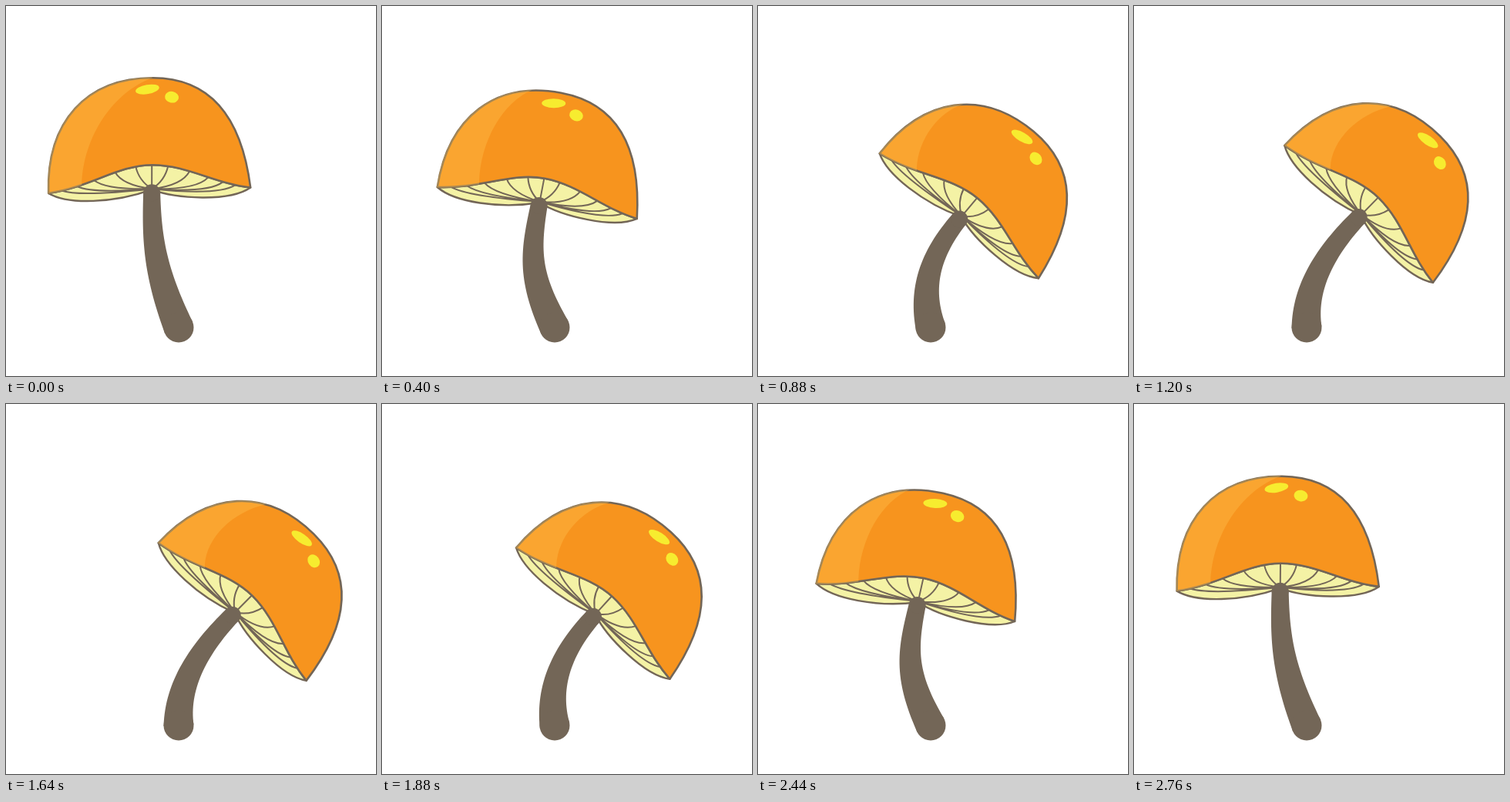
Write an HTML page with a canvas that moves like this. It is 480 px wide and 480 px high and loops after 2800 ms.

```html
<!DOCTYPE html>
<html lang="en">
<head>
<meta charset="utf-8">
<title>Swaying mushroom</title>
<style>
  html, body { margin: 0; width: 100%; height: 100%; overflow: hidden; background: #fff; }
  canvas { display: block; width: 480px; height: 480px; }
</style>
</head>
<body>
<canvas id="stage" width="480" height="480"></canvas>
<script>
const ctx = document.getElementById('stage').getContext('2d');
const LOOP = 2800, LAG = 36, STEP = 40;
const BROWN = '#736657', ORANGE = '#f7941e', GILL = '#f4f2a5', YELLOW = '#f7ec2f';
const PIVOT = [186, 238], BASE = [224, 417];

// sway, cap x, cap y, cap turn, base lean, base pull, shade foot x, y, shade top x, y
const POSES = [
  [0, 186, 238, 0, -23, 80, -88, -7, 4, -145],
  [.158, 201.5, 254.5, 10.75, -27, 75, -75.5, -26.5, -6, -146],
  [.308, 220, 262.7, 20.6, -26, 66, -71, -41, -7, -146],
  [.518, 242.5, 270, 33.1, -22, 58, -63.5, -55, -2.5, -146],
  [.659, 261.5, 271.5, 39.9, -15, 50, -55.5, -61.5, 6.5, -145],
  [.94, 293.3, 269, 44.6, -3, 50, -37, -60, 42, -139],
  [1, 302, 267, 45, 0, 50, -33, -60, 48, -137]
];

const EDGE = 'C270 230 235 206 190 206 C145 206 110 235 55 243';
const cap = new Path2D('M55 243 C52 150 104 93 190 93 C270 93 306 150 317 235 ' + EDGE + 'Z');
const under = new Path2D('M317 235 ' + EDGE + ' C80 258 140 256 189 238 C220 250 290 254 317 235Z');
const gills = new Path2D('M189 237V206');
const gillEnds = [[168, 208], [141, 215], [114, 226], [92, 234], [72, 239.5],
                  [210, 207.5], [238, 214], [262, 222], [281, 228], [297, 232]];
for (const [x, y] of gillEnds) {
  const d = x - 189;
  gills.moveTo(189, 237);
  gills.quadraticCurveTo(189 + d * .8, 222 + Math.abs(d) * .22, x, y);
}

const rad = deg => deg * Math.PI / 180;

// Smooth curve through the poses
function poseAt(p) {
  const last = POSES.length - 1;
  let i = 0;
  while (i < last - 1 && p > POSES[i + 1][0]) i++;
  const a = POSES[i], b = POSES[i + 1];
  const h = b[0] - a[0], t = (p - a[0]) / h;
  const slope = (j, k) => {
    const u = POSES[Math.max(j - 1, 0)], v = POSES[Math.min(j + 1, last)];
    return (v[k] - u[k]) / (v[0] - u[0]) * h;
  };
  return a.map((va, k) => {
    const vb = b[k], ma = slope(i, k), mb = slope(i + 1, k), d = vb - va;
    return va + t * (ma + t * (3 * d - 2 * ma - mb + t * (ma + mb - 2 * d)));
  });
}

function paint(path, fill) {
  ctx.fillStyle = fill;
  ctx.fill(path);
  ctx.stroke(path);
}

function spot(x, y, rx, ry, turn) {
  ctx.beginPath();
  ctx.ellipse(x, y, rx, ry, rad(turn), 0, 7);
  ctx.fillStyle = YELLOW;
  ctx.fill();
}

function toCap(x, y, turn) {
  ctx.translate(x, y);
  ctx.rotate(turn);
  ctx.translate(-PIVOT[0], -PIVOT[1]);
}

function drawCap(x, y, turn) {
  ctx.save();
  toCap(x, y, turn);
  ctx.strokeStyle = BROWN;
  ctx.lineJoin = 'round';
  ctx.lineWidth = 2.4;
  paint(under, GILL);
  ctx.lineWidth = 2;
  ctx.stroke(gills);
  ctx.lineWidth = 2.6;
  paint(cap, ORANGE);
  spot(183, 108, 15.5, 6, -10);
  spot(214.7, 118, 9, 7.3, 10);
  ctx.restore();
}

// The light side keeps facing left while the cap turns
function drawShade(x, y, turn, bx, by, ex, ey) {
  const w = ex - bx, h = by - ey;
  ctx.save();
  toCap(x, y, turn);
  ctx.translate(186, 170);
  ctx.scale(1.007, 1.01);
  ctx.translate(-186, -170);
  ctx.clip(cap);
  ctx.setTransform(1, 0, 0, 1, x, y);
  ctx.beginPath();
  ctx.moveTo(bx, by + 100);
  ctx.lineTo(bx, by);
  ctx.bezierCurveTo(bx + 2, by - h * .45, ex - w * .55, ey + h * .13, ex, ey);
  ctx.lineTo(ex, -250);
  ctx.lineTo(-250, -250);
  ctx.lineTo(-250, by + 100);
  ctx.fillStyle = 'rgba(255,192,78,.38)';
  ctx.fill();
  ctx.restore();
}

function drawStem(x, y, turn, lean, pull, sway) {
  const s = Math.sin(turn), c = Math.cos(turn), len = 58 + 7 * sway;
  const top = [x + 3 * c - 4 * s, y + 3 * s + 4 * c];
  const pts = [
    top,
    [top[0] - len * s, top[1] + len * c],
    [BASE[0] + pull * Math.sin(lean), BASE[1] - pull * Math.cos(lean)],
    BASE
  ];
  const left = [], right = [];
  for (let i = 0; i <= 32; i++) {
    const t = i / 32, u = 1 - t;
    const at = k => u * u * u * pts[0][k] + 3 * u * u * t * pts[1][k] + 3 * u * t * t * pts[2][k] + t * t * t * pts[3][k];
    const dir = k => u * u * (pts[1][k] - pts[0][k]) + 2 * u * t * (pts[2][k] - pts[1][k]) + t * t * (pts[3][k] - pts[2][k]);
    const dx = dir(0), dy = dir(1), r = (11 + 5 * t + 3.5 * t * t) / Math.hypot(dx, dy);
    left.push([at(0) - dy * r, at(1) + dx * r]);
    right.unshift([at(0) + dy * r, at(1) - dx * r]);
  }
  ctx.fillStyle = BROWN;
  ctx.beginPath();
  for (const p of left.concat(right)) ctx.lineTo(...p);
  ctx.fill();
  for (const [p, r] of [[top, 11], [BASE, 19.5]]) {
    ctx.beginPath();
    ctx.arc(p[0], p[1], r, 0, 7);
    ctx.fill();
  }
}

function frame() {
  const now = Math.floor(performance.now() % LOOP / STEP) * STEP;
  const sway = (1 - Math.cos(2 * Math.PI * (now - LAG) / LOOP)) / 2;
  const [, x, y, deg, lean, pull, ...shade] = poseAt(sway);
  const turn = rad(deg);
  ctx.fillStyle = '#fff';
  ctx.fillRect(0, 0, 480, 480);
  drawCap(x, y, turn);
  drawShade(x, y, turn, ...shade);
  drawStem(x, y, turn, rad(lean), pull, sway);
  requestAnimationFrame(frame);
}
frame();
</script>
</body>
</html>
```
